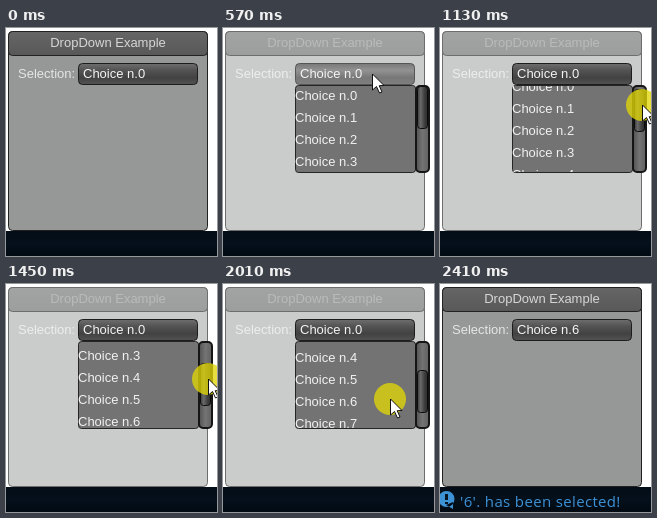
Recreate the animation shown at these times as an HTML page with a canvas. Size 211 px wide and 228 px high, loop 3110 ms.

```html
<!DOCTYPE html>
<html lang="en">
<head>
<meta charset="utf-8">
<title>Drop-down example</title>
<style>
html, body { margin: 0; width: 100%; height: 100%; overflow: hidden; background: #fff; }
canvas { display: block; width: 211px; height: 228px; }
</style>
</head>
<body>
<canvas id="stage"></canvas>
<script>
const W = 211, H = 228, LOOP = 3110, START = 250, STEP = 80;
const OPEN_AT = 570, CLOSE_AT = 2090, LEAVE_AT = 2410;
const DRAG_AT = 1050, DRAG_Y = 74, THUMB_RATIO = 0.34;
const ROW = 22, UI_FONT = '13px "Liberation Sans", Arial, sans-serif';

// Pointer path: time, x, y
const path = [
  [250, 180, 150], [410, 149, 46], [650, 149, 46], [970, 202, 74],
  [1050, 202, 74], [1130, 202, 77], [1450, 202, 95], [1690, 199, 102],
  [1770, 199, 102], [1930, 167, 115], [2170, 167, 115], [2250, 174, 123],
  [2330, 191, 49]
];
const presses = [[490, 570], [1050, 1690], [2010, 2090]];

const canvas = document.getElementById('stage');
const ctx = canvas.getContext('2d');
const dpr = window.devicePixelRatio || 1;
canvas.width = W * dpr;
canvas.height = H * dpr;

function pointerAt(t) {
  const i = path.findIndex(key => key[0] > t);
  if (i < 0) return { x: path.at(-1)[1], y: path.at(-1)[2] };
  const [t0, x0, y0] = path[i - 1], [t1, x1, y1] = path[i];
  const k = (t - t0) / (t1 - t0);
  return { x: Math.round(x0 + (x1 - x0) * k), y: Math.round(y0 + (y1 - y0) * k) };
}

function gradient(x0, y0, x1, y1, colors) {
  const g = ctx.createLinearGradient(x0, y0, x1, y1);
  colors.forEach((c, i) => g.addColorStop(i / (colors.length - 1), c));
  return g;
}

function box(x, y, w, h, radius, fill, stroke, line = 1) {
  ctx.beginPath();
  ctx.roundRect(x + line / 2, y + line / 2, w - line, h - line, radius);
  ctx.fillStyle = fill;
  ctx.fill();
  ctx.strokeStyle = stroke;
  ctx.lineWidth = line;
  ctx.stroke();
}

function label(text, x, y, color, font = UI_FONT, align = 'left') {
  ctx.font = font;
  ctx.textAlign = align;
  ctx.fillStyle = color;
  ctx.fillText(text, x, y);
}

function drawWindow(open) {
  const border = open ? '#6c6d6c' : '#202120';
  box(2, 3, 200, 200, 4, open ? '#cacccb' : '#969897', border);
  box(2, 3, 200, 25, 4,
    gradient(0, 3, 0, 28, open ? ['#a2a4a3', '#9c9e9d'] : ['#656665', '#575857']), border);
  label('DropDown Example', 102, 19, open ? '#b9bbba' : '#d6d7d6', UI_FONT, 'center');
  label('Selection:', 12, 50, open ? '#eceded' : '#e4e5e4');
}

function drawButton(choice, hover) {
  const shades = hover
    ? ['#777', '#929292', '#777', '#818181']
    : ['#707070', '#535353', '#424242', '#545454'];
  box(72, 35, 120, 22, 4, gradient(0, 35, 0, 57, shades), hover ? '#555' : '#1c1c1c');
  label('Choice n.' + choice, 77, 50, '#f4f4f4');
}

function drawList(thumb) {
  box(72, 57, 121, 88, 3, '#737373', '#252525');
  ctx.save();
  ctx.beginPath();
  ctx.rect(72, 58, 120, 86);
  ctx.clip();
  for (let i = 0; i < 10; i++) {
    label('Choice n.' + i, 72, Math.round(72 + i * ROW - thumb / THUMB_RATIO), '#f1f1f1');
  }
  ctx.restore();
  box(192, 57, 15, 88, 4, gradient(192, 0, 207, 0, ['#4c4c4c', '#747474', '#5c5c5c']), '#151515', 2);
  box(194, 58 + thumb, 11, 43, 3,
    gradient(194, 0, 205, 0, ['#343434', '#6a6a6a', '#404040', '#292929']), '#0c0c0c');
}

function drawStatus() {
  ctx.fillStyle = '#3d91d5';
  ctx.beginPath();
  ctx.arc(6.5, 215, 8, 0, Math.PI * 2);
  ctx.moveTo(6, 221);
  ctx.lineTo(13, 225);
  ctx.lineTo(13, 218);
  ctx.fill();
  ctx.fillStyle = '#071522';
  ctx.fillRect(5, 210, 3, 6);
  ctx.fillRect(5, 218, 3, 2);
  ctx.letterSpacing = '0.35px';
  label("'6'. has been selected!", 20, 223, '#3d91d5', '15px "Open Sans", "Noto Sans", sans-serif');
  ctx.letterSpacing = '0px';
}

function drawPointer({ x, y }, pressed) {
  if (pressed) {
    ctx.fillStyle = 'rgba(224, 214, 8, 0.78)';
    ctx.beginPath();
    ctx.arc(x, y, 16, 0, Math.PI * 2);
    ctx.fill();
  }
  const arrow = [[0, 0], [0, 16], [4, 12.5], [7, 19], [9.5, 18], [6.7, 11.7], [11.5, 11.5]];
  ctx.beginPath();
  arrow.forEach(([dx, dy]) => ctx.lineTo(x + dx + 0.5, y + dy));
  ctx.closePath();
  ctx.fillStyle = '#fff';
  ctx.fill();
  ctx.strokeStyle = '#111';
  ctx.lineWidth = 1;
  ctx.stroke();
}

function draw(time) {
  const t = time < START ? 0 : START + Math.floor((time - START) / STEP) * STEP;
  const open = t >= OPEN_AT && t < CLOSE_AT;
  const selected = t >= CLOSE_AT;
  const visible = t >= START && t < LEAVE_AT;
  const pointer = visible ? pointerAt(t) : null;
  const hover = visible && pointer.x >= 72 && pointer.x < 192 && pointer.y >= 35 && pointer.y < 57;
  const dragY = pointerAt(Math.max(DRAG_AT, Math.min(t, 1690))).y;

  ctx.setTransform(dpr, 0, 0, dpr, 0, 0);
  ctx.fillStyle = '#fff';
  ctx.fillRect(0, 0, W, H);
  ctx.fillStyle = gradient(0, 203, 0, H, ['#030d17', '#04101b', '#020a12']);
  ctx.fillRect(0, 203, W, H - 203);
  drawWindow(open);
  drawButton(selected ? 6 : 0, hover);
  if (open) drawList(dragY - DRAG_Y);
  if (selected) drawStatus();
  if (visible) drawPointer(pointer, presses.some(([from, to]) => t >= from && t < to));
}

const began = performance.now();
function tick() {
  draw((performance.now() - began) % LOOP);
  requestAnimationFrame(tick);
}
tick();
</script>
</body>
</html>
```
